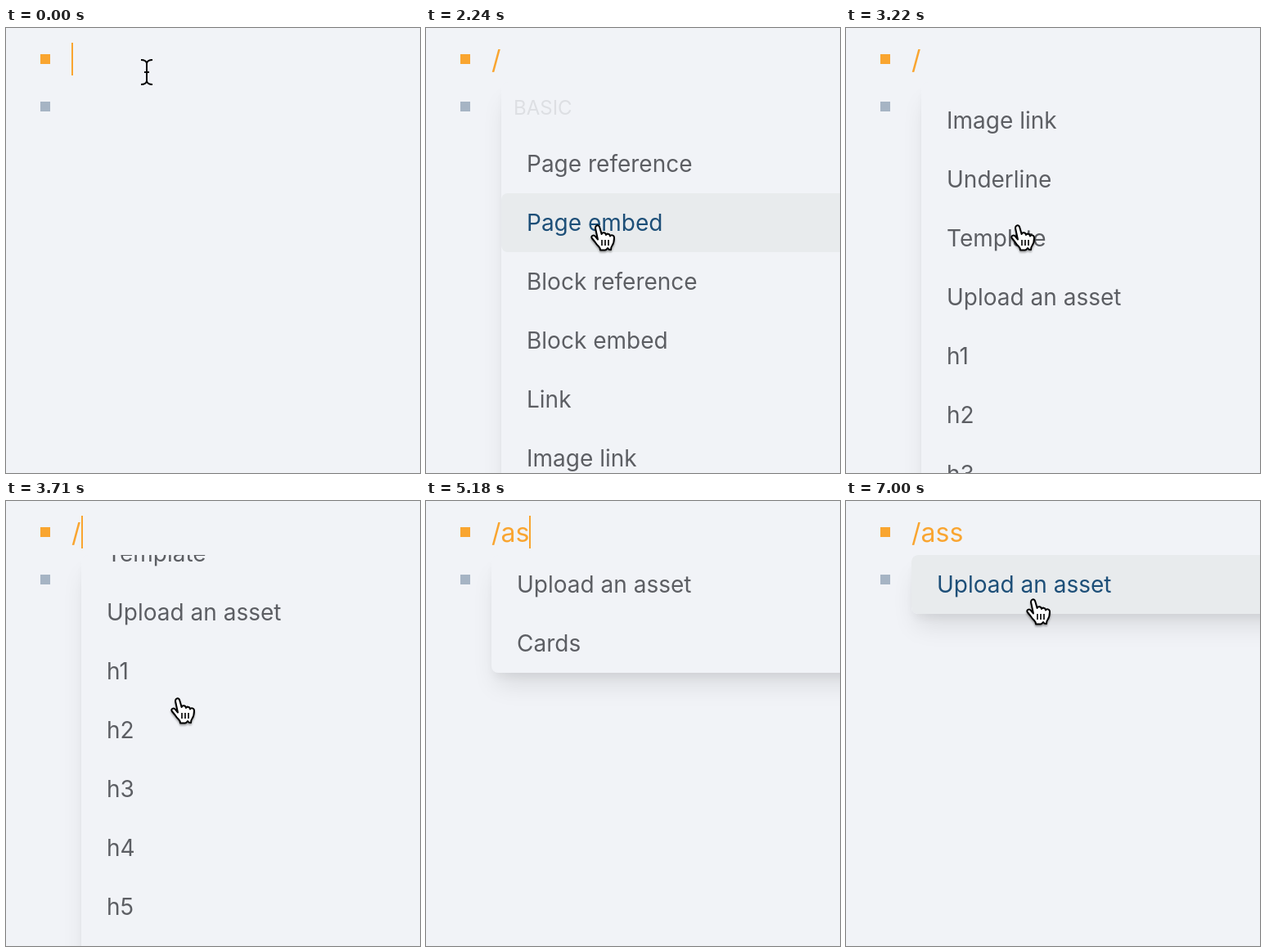
An HTML page that plays this animation: 506 px wide and 544 px high, repeating every 7.07 s.

```html
<!DOCTYPE html>
<html lang="en">
<head>
<meta charset="utf-8">
<title>Slash command menu</title>
<style>
  html, body { margin: 0; width: 100%; height: 100%; overflow: hidden; background: #f1f3f7; }
  body { font-family: Inter, Roboto, sans-serif; }
  #stage { position: relative; width: 506px; height: 544px; overflow: hidden; }
  .bullet { position: absolute; left: 42px; width: 12px; height: 12px; }
  #line {
    position: absolute; left: 80px; top: 18px; height: 40px; display: flex;
    font-size: 32px; line-height: 42px; color: #f9a530; white-space: pre;
  }
  #caret { width: 2px; height: 40px; background: #f9a530; }
  #menu {
    position: absolute; top: 66px; width: 620px; overflow: hidden;
    border-radius: 8px; background: #f1f3f7;
    box-shadow: 0 20px 30px -6px rgba(0, 0, 0, .1), 0 8px 12px -4px rgba(0, 0, 0, .06);
  }
  .head { height: 64px; padding-left: 15px; font-size: 24px; line-height: 63px; color: #dddfe3; }
  .row {
    height: 72px; padding-left: 31px; border-radius: 8px;
    font-size: 28px; line-height: 72px; color: #5c5e63; white-space: nowrap;
  }
  .chosen { background: #cfe4be; }
  .hover { background: #e8ebed; color: #1d4f78; }
  svg { position: absolute; left: 0; top: 0; overflow: visible; }
  #hand { filter: drop-shadow(0 2px 1px rgba(0, 0, 0, .35)); }
</style>
</head>
<body>
<div id="stage">
  <div class="bullet" style="top:32px;background:#f9a530"></div>
  <div class="bullet" style="top:90px;background:#a6b4c4"></div>
  <div id="line"><span id="query"></span><i id="caret"></i></div>
  <div id="menu"><div id="list"></div></div>
  <svg id="beam" width="16" height="34" fill="none" stroke="#000" stroke-width="2">
    <path d="M-7-15q6 0 7 4q1-4 7-4M-7 15q6 0 7-4q1 4 7 4M0-11V11M-3 0H3"/>
  </svg>
  <svg id="hand" width="32" height="34" fill="#fff" stroke="#000" stroke-width="2" stroke-linejoin="round">
    <path d="M9 18.5L6.3 6C5 .5 10.3-.2 11.5 4.5L13.6 12C14 9.6 18.6 9.4 19 13C19.8 11 23.6 11 24 14.4C25 12.6 29 12.8 29 16.5C29 21 28.6 23 26.5 26Q25 28 25 31Q22.5 31.5 21 29Q19 32 17.5 31.5H12Q12 29 10 27Q7 24 5.5 21.5L1.8 17C0 14 4 12.4 6 14.8Z"/>
    <path d="M14 19v7M18 19v7M22 19v7" stroke-width="1.6"/>
  </svg>
</div>
<script>
const LOOP = 7070, STEP = 70, TOP = 66, HEAD = 64, ROW = 72;
const $ = id => document.getElementById(id);
const clamp = u => Math.min(1, Math.max(0, u));
const span = (t, a, b) => clamp((t - a) / (b - a));
const ease = u => u * u * (3 - 2 * u);
const mix = (a, b, u) => a + (b - a) * u;

const MENUS = {
  '': [],
  '/': ['Page reference', 'Page embed', 'Block reference', 'Block embed', 'Link', 'Image link',
        'Underline', 'Template', 'Upload an asset', 'h1', 'h2', 'h3', 'h4', 'h5', 'h6'],
  '/a': ['Upload an asset', 'Page reference', 'Page embed', 'Image link', 'Template', 'Cards'],
  '/as': ['Upload an asset', 'Cards'],
  '/ass': ['Upload an asset']
};
const TYPED = [[210, '/'], [4760, '/a'], [5040, '/as'], [5460, '/ass']];

let shown = null;
function build(query) {
  if (query === shown) return;
  shown = query;
  const full = query === '/', rows = MENUS[query];
  $('query').textContent = query;
  $('list').innerHTML = (full ? '<div class="head">BASIC</div>' : '') +
    rows.map(name => `<div class="row">${name}</div>`).join('');
  $('menu').style.left = (full ? 92 : 80) + 'px';
  $('menu').style.height = (full ? 620 : rows.length * ROW) + 'px';
}

function scrollAt(t) {
  if (t < 3220) {
    const u = span(t, 2380, 3220);
    return 413 * ease(u) + 466 * (u ** 3 - u ** 2);
  }
  const v = 1 - span(t, 3220, 4060);
  return 413 + 233 * (1 - v * v);
}

// Pointer hotspot; null while typing hides it.
function pointerAt(t) {
  if (t < 210) return [172, 54];
  if (t >= 1680 && t < 4760) {
    const u = ease(span(t, 1680, 2170));
    return [mix(172, 209, u), mix(54, 241, u)];
  }
  if (t >= 6440) {
    const u = ease(span(t, 6440, 6930));
    return [mix(209, 228, u), mix(241, 120, u)];
  }
  return null;
}

function caretOn(t) {
  if (t < 210) return t < 70;
  const since = t - (t < 4760 ? 330 : t < 5460 ? 4760 : 5460);
  return t < 4760 || t >= 5460 ? Math.floor(Math.max(0, since) / 500) % 2 === 0 : true;
}

function place(el, on, x, y) {
  el.style.display = on ? 'block' : 'none';
  if (on) el.style.transform = `translate(${x}px, ${y}px)`;
}

function draw(t) {
  const query = TYPED.reduce((q, [at, text]) => t >= at ? text : q, '');
  build(query);
  $('caret').style.opacity = caretOn(t) ? 1 : 0;
  $('menu').style.opacity = span(t, 210, 420);

  const full = query === '/';
  $('list').style.transform = `translateY(${full ? -scrollAt(t) : 0}px)`;

  const p = pointerAt(t), [x, y] = p || [0, 0];
  const beam = p && y < TOP;
  place($('beam'), beam, x, y);
  place($('hand'), p && !beam, x - 8, y - 1);

  const first = TOP + (full ? HEAD : 0);
  const still = t < 2380 || t >= 4760;
  const over = p && still ? Math.floor((y - first) / ROW) : -1;
  const chosen = full && t < 2380 && over < 0 ? 0 : -1;
  const tint = full ? span(t, 4230, 4450) : 0;
  document.querySelectorAll('.row').forEach((row, i) => {
    row.classList.toggle('hover', i === over);
    row.classList.toggle('chosen', i === chosen);
    row.style.color = tint && i === 10
      ? `rgb(${mix(92, 29, tint)}, ${mix(94, 79, tint)}, ${mix(99, 120, tint)})` : '';
  });
}

const start = performance.now();
function tick() {
  const t = (performance.now() - start) % LOOP;
  draw(Math.floor(t / STEP) * STEP);
  requestAnimationFrame(tick);
}
tick();
</script>
</body>
</html>
```
